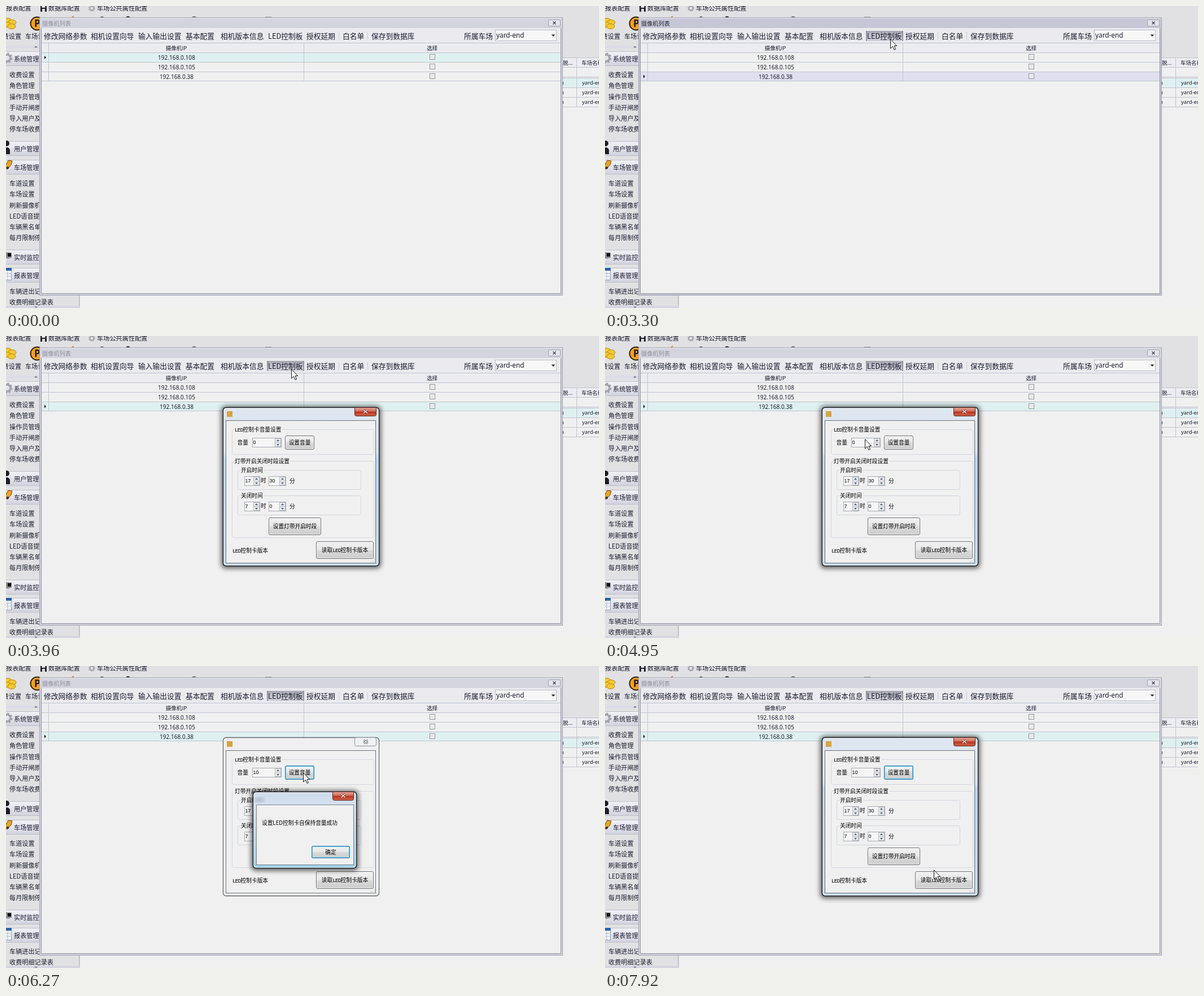
An HTML page that plays this animation: 1050 px wide and 534 px high, repeating every 8 s.

```html
<!DOCTYPE html>
<html lang="zh-CN">
<head>
<meta charset="utf-8">
<title>摄像机列表</title>
<style>
html, body { margin: 0; width: 100%; height: 100%; overflow: hidden; background: #f0f0f0; }
svg { display: block; width: 1050px; height: 534px; }
text { font-family: "Noto Sans CJK SC", "Noto Sans CJK", sans-serif; white-space: pre; }
.num { font-family: "Noto Sans", "Open Sans", sans-serif; }
.digit { font-family: "Liberation Sans", sans-serif; }
.mono { font-family: "Liberation Mono", monospace; letter-spacing: -.95px; }

/* One step lasts 330 ms = 4.125% of the loop. */
.a { animation: 8s step-end infinite; }
.cursor { animation-name: cursor; }
.row { animation-name: row; }
.rowfill { animation-name: rowfill; }
.frame { animation-name: frame; }
.title { animation-name: title; }
.led { animation-name: led; }
.dialog { animation-name: dialog; }
.before { animation-name: before; }
.after { animation-name: after; }
.hover { animation-name: hover; }
.focus { animation-name: focus; }
.back { animation-name: back; }
.front { animation-name: front; }
.ok { animation-name: ok; }

@keyframes cursor {
  0% { transform: translate(-40px, -40px); }
  4.125% { transform: translate(1028px, 227px); }
  12.375% { transform: translate(327px, 131px); }
  16.5% { transform: translate(319px, 129px); }
  24.75% { transform: translate(513px, 69px); }
  28.875% { transform: translate(546px, 65px); }
  33% { transform: translate(557px, 57px); }
  37.125% { transform: translate(505px, 58px); }
  53.625% { transform: translate(497px, 152px); }
  57.75% { transform: translate(438px, 180px); }
  61.875% { transform: translate(460px, 182px); }
  66% { transform: translate(493px, 184px); }
  70.125% { transform: translate(526px, 189px); }
  74.25% { transform: translate(526px, 188px); }
  82.5% { transform: translate(557px, 283px); }
  86.625% { transform: translate(574px, 330px); }
  99%, 100% { transform: translate(582px, 360px); }
}
@keyframes row { 0% { transform: none; } 20.625%, 100% { transform: translateY(33.6px); } }
@keyframes rowfill { 0% { fill: #dff0f0; } 20.625% { fill: #e0dff0; } 45.375%, 100% { fill: #dff0f0; } }
@keyframes frame { 0% { fill: #d4d4de; } 20.625% { fill: #c6c6d6; } 45.375%, 100% { fill: #d4d4de; } }
@keyframes title { 0% { fill: #8e8e98; } 20.625% { fill: #26262e; } 45.375%, 100% { fill: #8e8e98; } }
@keyframes led { 0% { opacity: 0; } 37.125%, 100% { opacity: 1; } }
@keyframes dialog { 0% { opacity: 0; } 49.5%, 100% { opacity: 1; } }
@keyframes before { 0% { opacity: 1; } 66%, 100% { opacity: 0; } }
@keyframes after { 0% { opacity: 0; } 66%, 100% { opacity: 1; } }
@keyframes hover { 0% { opacity: 0; } 70.125% { opacity: 1; } 78.375%, 100% { opacity: 0; } }
@keyframes focus { 0% { opacity: 0; } 78.375%, 100% { opacity: 1; } }
@keyframes back { 0% { opacity: 1; } 78.375% { opacity: 0; } 90.75%, 100% { opacity: 1; } }
@keyframes front { 0% { opacity: 0; } 78.375% { opacity: 1; } 90.75%, 100% { opacity: 0; } }
@keyframes ok { 0% { opacity: 0; } 86.625% { opacity: 1; } 90.75%, 100% { opacity: 0; } }
</style>
</head>
<body>
<svg id="stage" viewBox="0 0 1050 534"></svg>
<script>
const INK = '#1c1c30';

// Shape helpers; text is placed by its visual centre line.
const rect = (x, y, w, h, fill, more = '') =>
  `<rect x="${x}" y="${y}" width="${w}" height="${h}" fill="${fill}" ${more}/>`;
const box = (x, y, w, h, fill, line, more = '') =>
  rect(x + .5, y + .5, w - 1, h - 1, fill, `stroke="${line}" ${more}`);
const path = (d, fill, more = '') => `<path d="${d}" fill="${fill}" ${more}/>`;
const line = (d, color, w = 1) => path(d, 'none', `stroke="${color}" stroke-width="${w}"`);
const dot = (x, y, r, fill, more = '') => `<circle cx="${x}" cy="${y}" r="${r}" fill="${fill}" ${more}/>`;
const text = (x, y, s, size, more = '') =>
  `<text x="${x}" y="${(y + size * .37).toFixed(2)}" font-size="${size}" fill="${INK}" ${more}>${s}</text>`;
const mid = 'text-anchor="middle"';
const group = (cls, s) => `<g class="a ${cls}">${s}</g>`;
const fade = (id, ...stops) => `<linearGradient id="${id}" x2="0" y2="1">` +
  stops.map(([o, c]) => `<stop offset="${o}" stop-color="${c}"/>`).join('') + '</linearGradient>';

// Dialog text: narrow fixed-pitch Latin between the Chinese glyphs.
const form = (x, y, s, more = '') =>
  text(x, y, s.replace('LED', '<tspan class="mono">LED</tspan>'), 9.7, `style="fill:#000" ${more}`);
const digits = (x, y, s) => text(x, y, s, 8.9, 'class="digit" style="fill:#000"');

const defs = '<defs>' +
  fade('head', [0, '#f1f1f6'], [.5, '#e2e2ec'], [1, '#d3d3e0']) +
  fade('press', [0, '#a4a4b0'], [.35, '#bdbdc7'], [1, '#d2d2da']) +
  fade('btn', [0, '#f2f2f2'], [.5, '#e6e6e6'], [.5, '#dadada'], [1, '#cdcdcd']) +
  fade('blue', [0, '#e8f5fd'], [.5, '#d6eefb'], [.5, '#bce4fb'], [1, '#a8d9f4']) +
  fade('red', [0, '#e9a99c'], [.45, '#cf6a58'], [.5, '#b7321d'], [1, '#d4664a']) +
  fade('glass', [0, '#dfe7f1'], [.28, '#d5e0ee'], [.32, '#b3d3f0'], [1, '#c4daee']) +
  fade('glass2', [0, '#cfdcec'], [.2, '#d5e1f1'], [.5, '#bfd6ea'], [1, '#9bd0e8']) +
  '<filter id="soft" x="-15%" y="-15%" width="130%" height="130%"><feGaussianBlur stdDeviation="4.5"/></filter>' +
  '</defs>';

const gear = (x, y, r) => dot(x, y, r, 'none', `stroke="#a2a2a8" stroke-width="${r * .6}"`) +
  dot(x, y, r * 1.4, 'none', `stroke="#a2a2a8" stroke-width="${r * .4}" stroke-dasharray="${r * .55}"`);

function mainToolbar() {
  const coin = (x, y) => `<ellipse cx="${x}" cy="${y}" rx="7" ry="4.5" fill="#f4c930" stroke="#b98512"/>`;
  return rect(0, 0, 1050, 91, '#e1e1e3') +
    text(0, 4, '报表配置', 11.2) + text(75, 4, '数据库配置', 11.2) + text(161, 4, '车场公共属性配置', 11.2) +
    rect(61, -2, 11, 12, '#22222a') + rect(63.5, -2, 6, 5, '#e8e8ee') + rect(64, 5, 5, 5, '#d8d8de') +
    gear(152, 4, 3.6) +
    coin(3, 26) + coin(11, 29) + coin(2, 33) + coin(10, 36) +
    dot(55, 31, 11.5, '#f5a01c', 'stroke="#2b2418" stroke-width="2"') +
    text(50, 31, 'P', 17, 'class="num" font-weight="bold"') +
    text(-17.6, 54, '收费设置', 11.2) + text(34, 54, '车场设置', 11.2) +
    line('M115 22L120 18', '#d98328', 2) + dot(170, 22, 3.5, '#50505a') + dot(216, 22, 4, '#33333d') +
    dot(277, 23, 3, '#e0b050') + dot(333, 23, 5, '#77777f') + box(459, 19, 11, 6, '#eee', '#999');
}

function sidebar() {
  const items = (y, ...names) => names.map((s, i) => text(6, y + i * 19.2, s, 11.15)).join('');
  const header = (y, s) => rect(0, y - 13, 130, 24, 'url(#head)') +
    line(`M0 ${y - 13.5}H130M0 ${y + 11.5}H130`, '#bdbdca') + text(14, y, s, 11.15);
  return rect(0, 70, 130, 464, '#e1e1e3') +
    path('M0 70H130V75H0z', '#dcdce8') + path('M50 73.5L53 70.5L56 73.5z', '#777788') +
    header(94, '系统管理') + items(122, '收费设置', '角色管理', '操作员管理', '手动开闸原因', '导入用户及车辆', '停车场收费规则') +
    header(253, '用户管理') + header(286, '车场管理') +
    items(314, '车道设置', '车场设置', '刷新摄像机', 'LED语音提示', '车辆黑名单', '每月限制停车') +
    header(445, '实时监控') + header(477, '报表管理') + items(505, '车辆进出记录', '收费明细记录表') +
    gear(2, 92, 6) +
    dot(1, 243, 5, '#1d1d24') + path('M-4 262V254Q2 246 7 254V262z', '#1d1d24') +
    path('M-2 284L4 273L11 274L9 281L2 289z', '#e9a324', 'stroke="#6b4a10"') + dot(3, 286, 2.2, '#333') +
    path('M-2 435L10 436V445L3 447L-2 445z', '#8c8c94') + rect(3, 437, 6, 6, '#111') +
    box(-4, 463, 14, 22, '#f6f8fc', '#8b9bb5') + rect(-4, 463, 14, 5, '#2c62ae') +
    line('M-2 473H10M-2 478H10M3 468V485', '#aab6ca') +
    line('M130 512V534', '#9d9dab') + path('M0 530H130V534H0z', '#d6d6e2') + path('M50 531.5H56L53 534z', '#777788');
}

function backTable() {
  return rect(980, 92, 70, 16, '#ececf1') + rect(980, 127, 70, 17, '#dff0f0') +
    line('M980 91.5H1050M980 108.5H1050M980 125.5H1050M980 127.5H1050M980 144.5H1050M980 161.5H1050M980 178.5H1050', '#c2c2d0') +
    line('M1010.5 92V178', '#c2c2d0') +
    text(986, 100, '脱...', 9.5) + text(1019, 100, '车场名称', 9.5) +
    [136, 153, 170].map(y => text(982, y, '0', 9.6, 'class="num"') + text(1020, y, 'yard-end', 9.4, 'class="num"')).join('');
}

function cameraWindow() {
  const tools = [[67, '修改网络参数'], [150, '相机设置向导'], [234, '输入输出设置'], [318, '基本配置'], [380, '相机版本信息'],
    [464, 'LED控制板'], [532, '授权延期'], [596, '白名单'], [647, '保存到数据库'], [811, '所属车场']];
  const check = y => box(750, y - 5, 10, 10, '#f6f6f6', '#8e8f96') + rect(752, y - 3, 6, 6, '#e6e6e9');
  const ips = ['192.168.0.108', '192.168.0.105', '192.168.0.38'];
  return box(59, 20, 927, 492, '#d4d4de', '#a3a3b3', 'class="a frame"') +
    line('M61 21.5H984', '#ececf4') +
    text(64, 31, '摄像机列表', 10.2, 'class="a title"') +
    box(960, 24, 22, 12, '#e4e4ec', '#a4a4b2', 'rx="1.5"') + line('M968.5 27.5L973.5 32.5M973.5 27.5L968.5 32.5', '#44444e', 1.4) +
    rect(62, 39, 921, 470, '#f0f0f0') + rect(62, 39, 921, 26, '#ebebef') +
    group('led', rect(462, 44, 66, 18, 'url(#press)') + line('M463 44V62M527 44V62', '#85858f', 1.5)) +
    tools.map(([x, s]) => text(x, 53, s, 12.75)).join('') +
    line('M589.5 46V60M640.5 46V60', '#c9c9d3') +
    box(866, 42, 109, 20, '#f7f7f8', '#b9b9c6') + text(868, 52, 'yard-end', 11.8, 'class="num"') +
    path('M965.5 50.5H972.5L969 54z', '#222') +
    rect(63, 66, 919, 16, '#ececf0') +
    group('row', rect(63, 82.5, 919, 16.8, '#dff0f0', 'class="a rowfill"') + path('M68 88L71 91L68 94z', '#111')) +
    line('M63 65.5H982M63 82.5H982M63 99.5H982M63 116.5H982M63 132.5H982', '#c0c4d2') +
    line('M75.5 66V133M527.5 66V133', '#c0c4d2') +
    text(301.5, 74.5, '摄像机IP', 9.6, mid) + text(754.5, 74.5, '选择', 9.6, mid) +
    ips.map((s, i) => text(302, 91.3 + i * 16.8, s, 10.1, `class="num" ${mid}`) + check(90 + i * 17)).join('') +
    line('M62.5 39V508.5H982.5V39', '#8d8d9d');
}

const button = (x, y, w, h, s, fill = 'url(#btn)', edge = '#707074') =>
  box(x, y, w, h, fill, edge, 'rx="2.5"') + box(x + 1, y + 1, w - 2, h - 2, 'none', '#ffffff99', 'rx="2"') +
  form(x + w / 2, y + h / 2, s, mid);
const ring = (x, y, w, h) => box(x, y, w, h, 'none', '#3c7fb1', 'rx="2.5"') +
  box(x + 1, y + 1, w - 2, h - 2, 'none', '#4cc4ec', 'rx="2"');
function closeMark(x, y, color, edge) {
  const d = `M${x - 3.5} ${y - 3}L${x + 3.5} ${y + 3}M${x + 3.5} ${y - 3}L${x - 3.5} ${y + 3}`;
  return line(d, edge, 3) + line(d, color, 1.5);
}
const redClose = (x, y, w) => path(`M${x} ${y}h${w}v12q0 3 -3 3h${6 - w}q-3 0 -3 -3z`, 'url(#red)', 'stroke="#5c2018"') +
  closeMark(x + w / 2, y + 7, '#fff', '#6b2a22');
const aero = (x, y, w, h, fill) =>
  rect(x - 3, y - 2, w + 6, h + 6, '#000', 'rx="8" opacity=".6" filter="url(#soft)"') +
  rect(x + .5, y + .5, w - 1, h - 1, fill, 'rx="5" stroke="#23262b" stroke-width="1.5"') +
  box(x + 1.5, y + 1.5, w - 3, h - 3, 'none', '#ffffffb0', 'rx="4"');

function spinner(x, y, w, value) {
  const b = x + w - 12;
  return box(x, y, w, 17, '#f6f6f6', '#a8abb2') + digits(x + 1.5, y + 7.5, value) +
    box(b, y + 1, 11, 8, '#ebebee', '#b4b8c0') + box(b, y + 8, 11, 8, '#ebebee', '#b4b8c0') +
    path(`M${b + 3} ${y + 6}h5l-2.5 -3z`, '#3f5878') + path(`M${b + 3} ${y + 11}h5l-2.5 3z`, '#3f5878');
}

function frameBox(x, y, w, h, s, tx, tw) {
  return box(x, y, w, h, 'none', '#d2d6e0', 'rx="3"') + rect(tx - 1, y - 2, tw + 2, 5, '#f0f0f0') + form(tx, y, s);
}

function ledDialog() {
  return rect(384.5, 126.5, 276, 280, '#f0f0f2', 'rx="5" stroke="#66696f" stroke-width="1.3"') +
    box(617, 126, 39, 16, '#f0f1f4', '#8c9098', 'rx="3"') + closeMark(637, 134, '#f4f4f4', '#555a62') +
    group('back', aero(384, 126, 277, 281, 'url(#glass)') + redClose(617.5, 126.5, 38)) +
    rect(391, 133, 10, 10, '#d9a441') +
    box(389, 149, 266, 253, '#f0f0f0', '#6d737c') +
    frameBox(400, 165, 252, 45, 'LED控制卡音量设置', 405, 83) +
    form(409.5, 188, '音量') + spinner(436, 180, 52, '') +
    group('before', digits(437.5, 187.5, '0')) + group('after', digits(437.5, 187.5, '10')) +
    button(494, 176, 52, 25, '设置音量') +
    group('hover', button(494, 176, 52, 25, '设置音量', 'url(#blue)', '#3c7fb1')) +
    group('focus', ring(494, 176, 52, 25)) +
    frameBox(400, 221, 252, 136, '灯带开启关闭时段设置', 405, 97) +
    frameBox(410, 237, 219, 35, '开启时间', 416, 39) + frameBox(410, 282, 219, 35, '关闭时间', 416, 39) +
    [[248, '17', '30'], [293, '7', '0']].map(([y, h, m]) =>
      spinner(422, y, 28, h) + form(451, y + 7.5, '时') + spinner(465, y, 31, m) + form(502, y + 8.5, '分')).join('') +
    button(465, 321, 93, 31, '设置灯带开启时段') +
    form(401, 379, 'LED控制卡版本') + button(549, 363, 102, 31, '读取LED控制卡版本') +
    [[652, 398], [649, 398], [652, 395], [646, 398], [652, 392]].map(([x, y]) => rect(x, y, 1.4, 1.4, '#b8b8bc')).join('');
}

function message() {
  return aero(437, 222, 184, 136, 'url(#glass2)') +
    rect(440, 233, 16, 7, '#70757e', 'opacity=".45" filter="url(#soft)"') +
    redClose(578.5, 222.5, 37) +
    box(443, 245, 173, 107, '#f0f0f0', '#7b838c') +
    text(453, 277, '设置LED控制卡自保持音量成功', 9.7, 'style="fill:#000"') +
    button(541, 318, 68, 22, '确定') +
    group('ok', button(541, 318, 68, 22, '确定', 'url(#blue)', '#3c7fb1')) + ring(541, 318, 68, 22);
}

const pointer = path('M.6 .8V17L4.4 13.4L7 19.4L9.6 18.3L7 12.5H11.6z', '#fff', 'stroke="#111" stroke-linejoin="round"');

document.getElementById('stage').innerHTML = defs + rect(0, 0, 1050, 534, '#f0f0f0') +
  mainToolbar() + sidebar() + backTable() + cameraWindow() +
  group('dialog', ledDialog()) + group('front', message()) + group('cursor', pointer);
</script>
</body>
</html>
```
